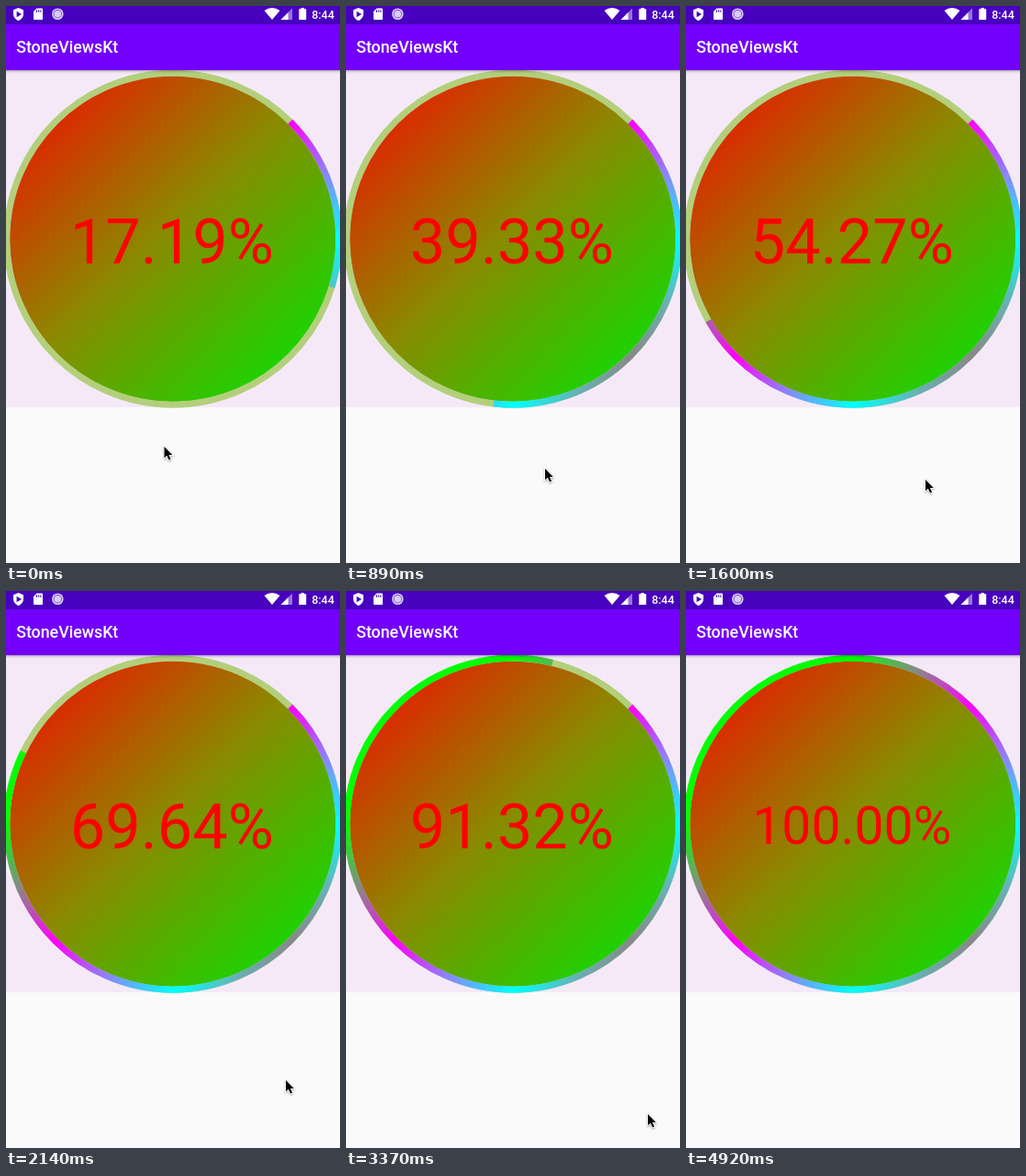
These frames come from a looping animation (364 by 608 pixels, 6.35 s). An HTML page with a canvas:

```html
<!DOCTYPE html>
<html lang="en">
<head>
<meta charset="utf-8">
<title>Progress ring</title>
<style>
html, body { margin: 0; width: 100%; height: 100%; overflow: hidden; background: #fafafa; }
canvas { display: block; }
</style>
</head>
<body>
<canvas id="stage" width="364" height="608"></canvas>
<script>
const ctx = document.getElementById('stage').getContext('2d');
const LOOP = 6350, STEP = 88.9, TAU = Math.PI * 2;
const CX = 181.8, CY = 254.2, START = -TAU / 8;

// [step, percent] and [step, x, y]
const progressKeys = [[0, 17.19], [10, 39.33], [18, 54.27], [24, 69.64],
  [30, 80.93], [38, 91.32], [39, 97.3], [43, 100]];
const cursorKeys = [[0, 172.5, 481], [8, 214, 504], [10, 217, 505], [18, 261, 517],
  [24, 305, 534], [30, 329, 571]];

function gradient(g, colors, end = 1) {
  colors.forEach((c, i) => g.addColorStop(end * i / (colors.length - 1), c));
  return g;
}
const ringPaint = gradient(ctx.createConicGradient(0, CX, CY),
  ['#0ff', '#68b1b6', '#888', '#68b1b6', '#0ff', '#88f', '#f0f', '#888', '#0f0',
    '#0f0', '#0f0', '#0f0', '#0f0', '#888', '#f0f', '#88f', '#0ff']);
const diskPaint = gradient(ctx.createLinearGradient(0, 71, 364, 438),
  ['#f00', '#8a8a00', '#00e600'], 0.95);
const shadowPaint = gradient(ctx.createLinearGradient(0, 70, 0, 74),
  ['rgba(0,0,0,.3)', 'rgba(0,0,0,.08)', 'rgba(0,0,0,0)']);

const shield = new Path2D('M13.5 2 L19 4.2 V8.5 C19 12 16.8 14.8 13.5 16 C10.2 14.8 8 12 8 8.5 V4.2 Z');
const play = new Path2D('M11.6 5.8 L17 9 L11.6 12.2 Z');
const card = new Path2D('M33.5 2.5 H39 Q40 2.5 40 3.5 V14 Q40 15 39 15 H31 Q30 15 30 14 V6 Z');
const wifi = new Path2D('M290 15 L281.5 5 Q290 -0.8 298.5 5 Z');
const signal = new Path2D('M299.5 15 L312 2.5 V15 Z');
const signalOn = new Path2D('M299.5 15 L307.5 7 V15 Z');
const battery = new Path2D('M321.5 2 H325 V3.3 H327.2 V15 H319.3 V3.3 H321.5 Z');
const arrow = new Path2D('M0 0 V14 L3.2 11.1 L5.7 16.6 L8 15.6 L5.6 10.2 H10 Z');

function lerpKeys(keys, at, field) {
  const i = keys.findIndex(k => k[0] >= at);
  if (i < 0) return field(keys[keys.length - 1]);
  if (i === 0) return field(keys[0]);
  const a = keys[i - 1], b = keys[i];
  return field(a) + (field(b) - field(a)) * (at - a[0]) / (b[0] - a[0]);
}

function stepAt(t) {
  return t < 3670 ? Math.min(38, Math.floor((t + 9) / STEP))
    : Math.min(43, 39 + Math.floor((t - 3670) / 90));
}

// Accelerate-decelerate easing between the keys
function percentAt(step) {
  return 50 * (1 - Math.cos(lerpKeys(progressKeys, step, k => Math.acos(1 - k[1] / 50))));
}

function fill(paint, path) {
  ctx.fillStyle = paint;
  ctx.fill(path);
}

function rect(paint, y, h) {
  ctx.fillStyle = paint;
  ctx.fillRect(0, y, 364, h);
}

function disc(paint, x, y, r) {
  ctx.beginPath();
  ctx.arc(x, y, r, 0, TAU);
  ctx.fillStyle = paint;
  ctx.fill();
}

// The tiny overlap keeps a full turn from collapsing to nothing
function ring(paint, sweep) {
  ctx.beginPath();
  ctx.arc(CX, CY, 181, START, START + sweep + 0.001);
  ctx.lineWidth = 7;
  ctx.strokeStyle = paint;
  ctx.stroke();
}

function text(str, x, y, font, color) {
  ctx.font = font + ' Roboto, sans-serif';
  ctx.fillStyle = color;
  ctx.fillText(str, x, y);
}

function drawBars() {
  rect(shadowPaint, 70, 4);
  rect('#7300fa', 20, 50);
  rect('#4600be', 0, 20);
  text('StoneViewsKt', 11.2, 51, '500 17.8px', '#fff');
  fill('#fff', shield);
  fill('#4600be', play);
  for (const icon of [card, wifi, signalOn, battery]) fill('#fff', icon);
  fill('rgba(255,255,255,.45)', signal);
  ctx.fillStyle = '#4600be';
  for (const x of [33, 35.2, 37.4]) ctx.fillRect(x, 4.3, 1, 2.6);
  disc('#d9cbf3', 56.3, 8.8, 6.3);
  disc('#7d55cf', 56.3, 8.8, 4.7);
  disc('#d9cbf3', 56.3, 8.8, 3.8);
  text('8:44', 333.2, 13.8, '500 12.5px', '#fff');
}

function drawGauge(percent) {
  rect('#f5e9f8', 69, 369);
  disc(diskPaint, CX, CY, 178);
  ring('#b3cf7c', TAU);
  ring(ringPaint, TAU * percent / 100);

  // The label takes the largest size step that fits
  const label = percent.toFixed(2) + '%';
  ctx.font = '100px Roboto, sans-serif';
  const size = Math.floor(22400 / ctx.measureText(label).width / 2.28) * 2.28;
  ctx.textAlign = 'center';
  text(label, 180.8, CY - 0.8 + size * 0.405, size + 'px', '#f00');
  ctx.textAlign = 'left';
}

function drawCursor(step, t) {
  const leave = t < 4570 ? 0 : Math.floor((t - 4570) / 87) + 1;
  if (leave > 4) return;
  ctx.save();
  ctx.translate(lerpKeys(cursorKeys, step, k => k[1]),
    lerpKeys(cursorKeys, step, k => k[2]) + leave * 8);
  ctx.scale(0.88, 0.88);
  ctx.shadowColor = 'rgba(0,0,0,.35)';
  ctx.shadowBlur = 2;
  ctx.shadowOffsetY = 1;
  ctx.lineWidth = 1.8;
  ctx.strokeStyle = '#fff';
  ctx.stroke(arrow);
  ctx.shadowColor = 'transparent';
  fill('#000', arrow);
  ctx.restore();
}

function draw(t) {
  const step = stepAt(t);
  rect('#fafafa', 0, 608);
  drawGauge(percentAt(step));
  drawBars();
  drawCursor(step, t);
}

let begin;
function tick(now) {
  begin ??= now;
  draw((now - begin) % LOOP);
  requestAnimationFrame(tick);
}
draw(0);
requestAnimationFrame(tick);
</script>
</body>
</html>
```
